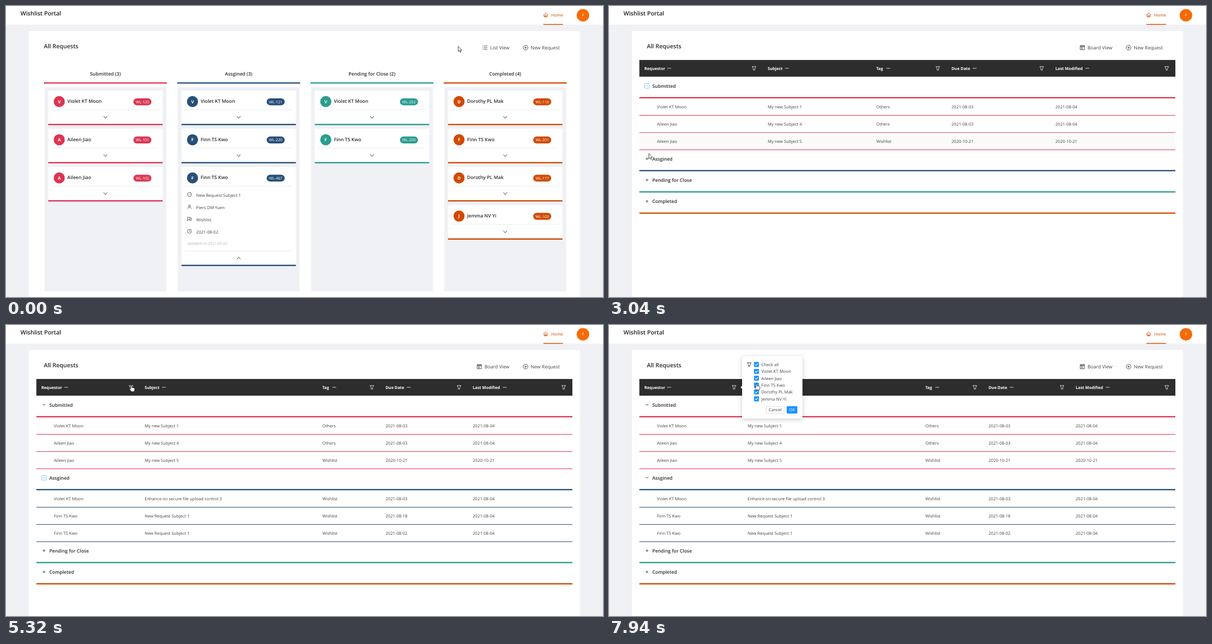
These frames come from a looping animation (1072 px wide and 523 px high, 8 s). An HTML page:

```html
<!DOCTYPE html>
<html lang="en">
<head>
<meta charset="utf-8">
<title>Request board</title>
<style>
html, body { margin: 0; width: 100%; height: 100%; overflow: hidden; background: #f0f1f5; }
svg { display: block; width: 100vw; height: 100vh; }
text { font-family: "Open Sans", "Noto Sans", sans-serif; text-rendering: geometricPrecision; }
</style>
</head>
<body>
<svg id="stage" viewBox="0 0 1072 523" preserveAspectRatio="none"></svg>
<script>
const LOOP = 8000, LIST_AT = 1010, POPUP_AT = 5400;
const OPEN_AT = [2690, 3660];
const INK = '#434343', DARK = '#2b2b2b', BRAND = '#d04a02', BLUE = '#1890ff';
const VIOLET = 'Violet KT Moon', AILEEN = 'Aileen Jiao', FINN = 'Finn TS Kwo',
  DOROTHY = 'Dorothy PL Mak', JEMMA = 'Jemma NV Yi';

const groups = [
  { name: 'Submitted', color: '#db3652', cards: [[VIOLET, 120], [AILEEN, 101], [AILEEN, 102]],
    rows: [[VIOLET, 'My new Subject 1', 'Others', '2021-08-03', '2021-08-04'],
           [AILEEN, 'My new Subject 4', 'Others', '2021-08-03', '2021-08-04'],
           [AILEEN, 'My new Subject 5', 'Wishlist', '2020-10-21', '2020-10-21']] },
  { name: 'Assgined', color: '#275078', cards: [[VIOLET, 121], [FINN, 220], [FINN, 467, true]],
    rows: [[VIOLET, 'Enhance on secure file upload control 3', 'Wishlist', '2021-08-03', '2021-08-04'],
           [FINN, 'New Request Subject 1', 'Wishlist', '2021-08-18', '2021-08-04'],
           [FINN, 'New Request Subject 1', 'Wishlist', '2021-08-02', '2021-08-04']] },
  { name: 'Pending for Close', color: '#2a9d8f', cards: [[VIOLET, 202], [FINN, 200]] },
  { name: 'Completed', color: BRAND, cards: [[DOROTHY, 116], [FINN, 201], [DOROTHY, 117], [JEMMA, 103]] }
];

// Column starts for no, one and two open groups.
const columnSets = [
  [63.5, 298.5, 446, 590, 787.5],
  [63.5, 285, 480, 615, 801.5],
  [63.5, 249, 568, 681.5, 838]
];
const headings = ['Requestor', 'Subject', 'Tag', 'Due Date', 'Last Modified'];
const dashOffsets = [41, 31, 18, 38, 54];

// Pointer: time, x, y, hand shape until the next key.
const pointerKeys = [
  [0, 812, 72.5, 0], [390, 812, 72.5, 0], [600, 856, 75, 1], [740, 872, 73.5, 1],
  [1830, 872, 73.5, 1], [1880, 864, 80, 0], [2400, 82, 143, 0], [2550, 71, 147, 1],
  [2850, 71, 147, 1], [2900, 71, 150, 0], [3040, 71.5, 265, 0], [3180, 71, 272, 1],
  [3390, 71, 275, 1], [4150, 71, 275, 1], [4200, 73, 273, 0], [4430, 88, 262, 0],
  [5100, 222, 116, 1], [5250, 225, 108, 1], [5690, 225, 108, 1], [5720, 226, 108, 1],
  [5800, 227, 108, 0], [6060, 238, 110, 0], [6600, 264, 110, 1], [6750, 266, 111, 1],
  [7939, 266, 111, 1], [7940, 265, 105, 1], [LOOP, 265, 105, 1]
];

const clamp = v => Math.max(0, Math.min(1, v));
const rect = (x, y, w, h, fill, extra = '') =>
  `<rect x="${x}" y="${y}" width="${w}" height="${h}" fill="${fill}" ${extra}/>`;
const circle = (x, y, r, fill, extra = '') => `<circle cx="${x}" cy="${y}" r="${r}" fill="${fill}" ${extra}/>`;
const text = (x, y, value, size, fill = INK, weight = 400, anchor = 'start') =>
  `<text x="${x}" y="${y}" font-size="${size}" fill="${fill}" font-weight="${weight}" text-anchor="${anchor}">${value}</text>`;
const icon = (x, y, d, stroke = INK, width = 0.9, fill = 'none') =>
  `<path transform="translate(${x} ${y})" d="${d}" fill="${fill}" stroke="${stroke}" stroke-width="${width}" stroke-linejoin="round"/>`;

const ring = r => `M${-r} 0A${r} ${r} 0 1 1 ${r} 0A${r} ${r} 0 1 1 ${-r} 0Z`;
const shapes = {
  home: 'M-4 .3L0-3.6L4 .3M-2.8-.6V3.5H2.8V-.6M-.9 3.5V1H.9V3.5',
  list: 'M-2-3H4.3M-2 0H4.3M-2 3H4.3M-4.2-3H-3M-4.2 0H-3M-4.2 3H-3',
  board: 'M-3.8-3.8H3.8V3.8H-3.8ZM-3.8-1.6H3.8M-1.2-1.6V3.8M-3.8-2.8H3.8M-1.2 1H1.5',
  add: ring(4.2) + 'M-2.2 0H2.2M0-2.2V2.2',
  filter: 'M-3.4-3.2H3.4L1.3.5V3.2H-1.3V.5Z',
  chat: ring(3.7) + 'M-2.1 0H-1.2M-.4 0H.5M1.2 0H2.1',
  user: 'M-1.8-1.6A1.8 1.8 0 1 1 1.8-1.6A1.8 1.8 0 1 1-1.8-1.6ZM-3.1 3.7C-3-.6 3-.6 3.1 3.7',
  flag: 'M-3.3-3.8V3.8M-3.3-3H.7V1.3H-3.3M.7-1.8H3.6V2.3H-.3V1.3',
  clock: ring(3.7) + 'M0-2.3V.3L1.7 1.4',
  down: 'M-3.2-2L0 2L3.2-2',
  up: 'M-3.2 2L0-2L3.2 2',
  check: 'M-2.2-.1L-.5 1.7L2.3-1.6',
  arrow: 'M0 0V9.4L2.2 7.4L3.7 10.8L5.2 10.1L3.8 6.9H6.7Z',
  hand: 'M-1 1Q0-.6 1 1V4.4Q2.2 3.7 2.8 4.7Q4 4.2 4.5 5.2Q6 5 6 6.6V8.6Q5.8 10 5 11.8H-.2Q-1.2 9.8-3 7.8Q-3.4 6.3-2 6.5L-1 7.4Z'
};

function pointerAt(t) {
  const i = pointerKeys.findIndex(key => key[0] > t);
  const a = pointerKeys[i - 1], b = pointerKeys[i];
  const k = (t - a[0]) / (b[0] - a[0]);
  return { x: a[1] + (b[1] - a[1]) * k, y: a[2] + (b[2] - a[2]) * k, hand: a[3] };
}

function pageFrame(isList) {
  return rect(0, 0, 1072, 523, '#f0f1f5') + rect(0, 0, 1072, 33.6, '#fff') + rect(41, 45, 989.5, 478, '#fff') +
    text(26, 17.4, 'Wishlist Portal', 10.5, '#1f1f1f', 600) +
    icon(969, 16, shapes.home, BRAND) + text(979, 18.7, 'Home', 7.5, BRAND) +
    rect(965, 32.4, 35, 1.4, BRAND) +
    circle(1036, 16.7, 11.2, '#f76a02') + text(1036, 19.3, 'F', 7, '#fff', 400, 'middle') +
    text(68, 76, 'All Requests', 10.5, DARK, 600) +
    icon(isList ? 850 : 860, 74.8, isList ? shapes.board : shapes.list) +
    text(904, 78, isList ? 'Board View' : 'List View', 8.55, INK, 400, 'end') +
    icon(933, 74.8, shapes.add) + text(942.3, 78, 'New Request', 8.5);
}

function card(x, y, color, [name, id, open]) {
  const height = open ? 178 : 62;
  const rule = dy => rect(x + 6, y + dy, 193, 0.8, '#e6e8eb');
  let out = rect(x, y, 205.5, height, '#fff') + rect(x, y + height - 2.2, 205.5, 2.4, color) +
    circle(x + 19.8, y + 19.8, 10, color) +
    text(x + 19.8, y + 22.6, name[0], 7.6, '#fff', 700, 'middle') +
    text(x + 34.3, y + 22, name, 8.5, DARK, 600) +
    rect(x + 153, y + 14, 32.3, 12.4, color, 'rx="6.2"') +
    text(x + 169.2, y + 22.8, 'WL-' + id, 6.9, '#fff', 400, 'middle') + rule(34.2);
  if (open) {
    const details = [['chat', 'New Request Subject 1'], ['user', 'Piers DM Yuen'], ['flag', 'Wishlist'], ['clock', '2021-08-02']];
    details.forEach(([shape, label], i) => {
      const cy = y + 50 + i * 22;
      out += icon(x + 14.3, cy - 0.4, shapes[shape], INK, 0.8) + text(x + 26.5, cy + 3.6, label, 7.55);
    });
    out += text(x + 10, y + 139.5, 'Updated on 2021-05-20', 6.55, '#a8b5ae') + rule(150.6);
  }
  return out + icon(x + 102.7, y + height - 14, open ? shapes.up : shapes.down, INK, 1);
}

function boardView() {
  return groups.map(({ name, color, cards }, i) => {
    const x = 68 + i * 239.3;
    return text(x + 110.5, 124.8, `${name} (${cards.length})`, 8.5, DARK, 600, 'middle') +
      rect(x, 137.2, 221, 2.3, color) + rect(x + 1, 146, 219, 367, '#f0f1f5') +
      cards.map((c, j) => card(x + 7.8, 152 + j * 68.6, color, c)).join('');
  }).join('');
}

function toggle(t, index, y) {
  const openAt = OPEN_AT[index] ?? Infinity;
  const [hoverIn, hoverOut, blurAt] = [[2550, 2880, 3660], [3180, 4200, 5400]][index] ?? [LOOP, LOOP, LOOP];
  const hovered = t >= hoverIn && t < hoverOut, focused = t >= hoverIn && t < blurAt;
  const border = hovered ? BLUE : focused ? '#7cc4fb' : '#c4c4c4';
  const visible = focused ? 1 : t >= blurAt ? 1 - clamp((t - blurAt - 150) / 150) : 0;
  const stem = 2.5 * (1 - clamp((t - openAt - 150) / 130));
  return rect(64, y - 4.2, 8.4, 8.4, '#fff', `rx="0.8" stroke="${border}" stroke-width="0.9" opacity="${visible}"`) +
    icon(68.2, y, `M-2.5 0H2.5M0 ${-stem}V${stem}`, focused ? border : '#444', 0.9);
}

function listView(t, pointerY) {
  const columns = columnSets[OPEN_AT.filter(at => t >= at).length];
  let out = rect(54.5, 97, 962.5, 30, '#2d2d2d');
  headings.forEach((label, i) => {
    out += text(columns[i], 114.7, label, 7.25, '#fff', 700) + rect(columns[i] + dashOffsets[i], 111.5, 7, 0.9, '#ddd');
    if (i !== 1) out += icon(i < 4 ? columns[i + 1] - 24.5 : 1001.5, 112, shapes.filter, '#eee', 0.85);
  });
  const band = (y, h) => pointerY >= y && pointerY < y + h ? rect(54.5, y, 962.5, h, '#fafafa') : '';
  let y = 127;
  groups.forEach(({ name, color, rows }, i) => {
    out += band(y, 38) + toggle(t, i, y + 16.5) + text(77.7, y + 19.7, name, 8.45, DARK, 600) +
      rect(54.5, y + 36.7, 962.5, 2.3, color);
    y += 38.2;
    if (!(t >= OPEN_AT[i])) return;
    rows.forEach(row => {
      out += band(y + 0.8, 30) + rect(54.5, y + 30.8, 962.5, 1, color);
      row.forEach((value, c) => out += text(c ? columns[c] : 86, y + 18.6, value, 7.55));
      y += 30.95;
    });
  });
  return out;
}

function popup(t) {
  const p = clamp((t - POPUP_AT) / 200);
  if (!p) return '';
  const button = (x, w, label, fill, stroke, color) =>
    rect(x, 146.2, w, 12.6, fill, `rx="1" stroke="${stroke}" stroke-width="0.7"`) +
    text(x + w / 2, 155.2, label, 7.5, color, 400, 'middle');
  const options = ['Check all', VIOLET, AILEEN, FINN, DOROTHY, JEMMA].map((label, i) => {
    const y = 71 + i * 12.35;
    return rect(260.4, y - 4.4, 8.8, 8.8, BLUE, 'rx="1"') + icon(264.8, y, shapes.check, '#fff', 1.1) +
      text(273.5, y + 2.9, label, 7.6);
  }).join('');
  return `<g opacity="${p}" transform="translate(236 112) scale(${0.8 + 0.2 * p}) translate(-236 -112)">` +
    `<g style="filter:drop-shadow(0 2px 4px rgba(0,0,0,.2))">` +
    rect(239, 56, 108.4, 112, '#fff', 'rx="1"') + icon(239, 112, 'M0-2.8L-2.8 0L0 2.8Z', 'none', 0, '#fff') + '</g>' +
    icon(251.8, 71, shapes.filter, DARK, 0.9) + options +
    button(282.3, 32.2, 'Cancel', '#fff', '#d4d4d4', INK) + button(319.4, 18.4, 'OK', BLUE, BLUE, '#fff') + '</g>';
}

const stage = document.getElementById('stage');
let shown = '';

function draw() {
  const t = performance.now() % LOOP;
  const isList = t >= LIST_AT;
  const pointer = pointerAt(t);
  const hoverY = pointerAt(Math.max(0, t - 40)).y;
  const scene = pageFrame(isList) + (isList ? listView(t, hoverY) + popup(t) : boardView()) +
    icon(pointer.x, pointer.y, pointer.hand ? shapes.hand : shapes.arrow, '#222', 0.8, '#fff');
  if (scene !== shown) stage.innerHTML = shown = scene;
  requestAnimationFrame(draw);
}
draw();
</script>
</body>
</html>
```
